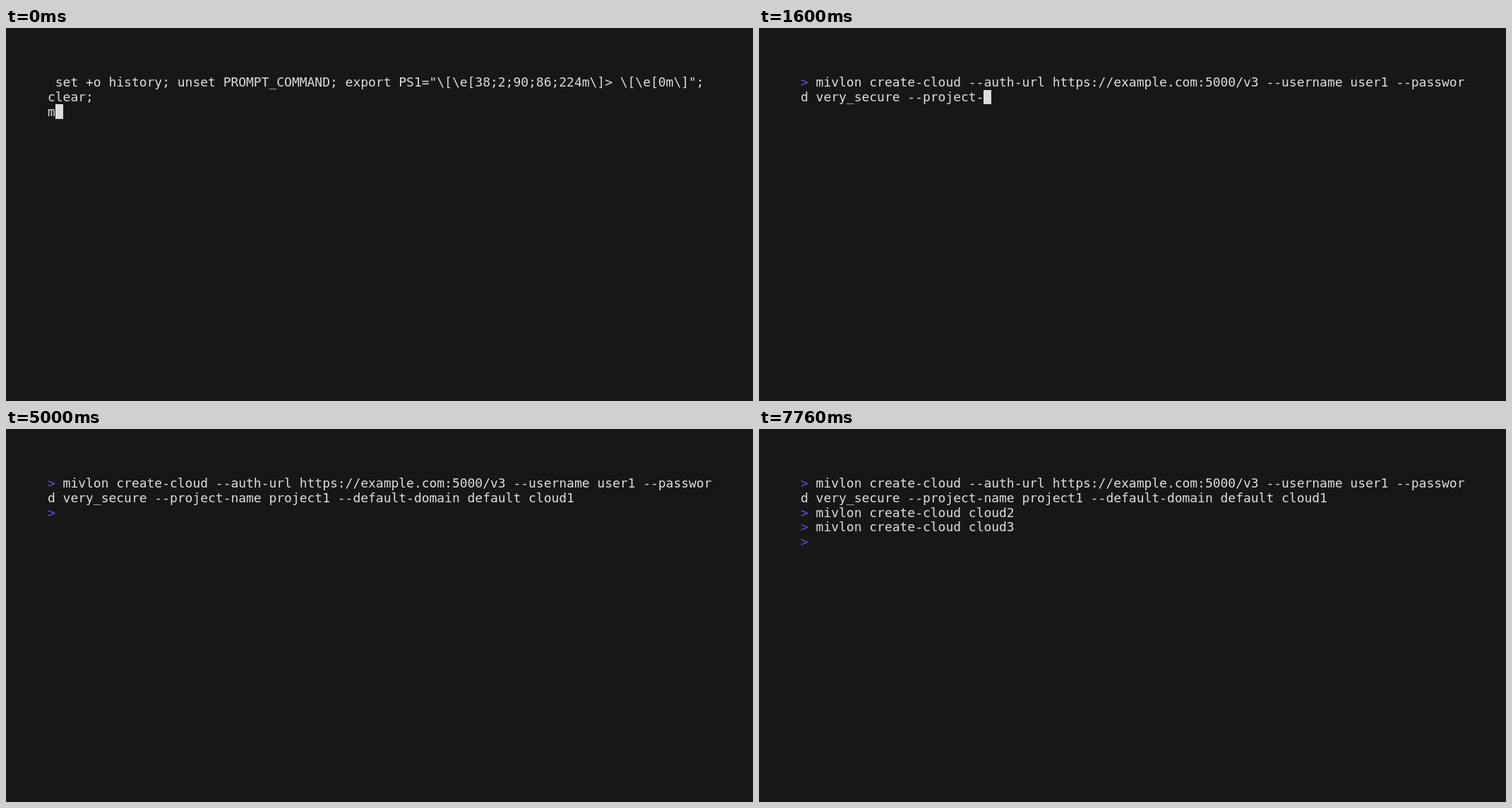
Recreate the animation shown at these times as an HTML page with a canvas. Size 1058 by 529 pixels, loop 8000 ms.

```html
<!DOCTYPE html>
<html lang="en">
<head>
<meta charset="utf-8">
<title>Terminal session</title>
<style>
  html, body { margin: 0; width: 100%; height: 100%; overflow: hidden; background: #171717; }
  canvas { display: block; }
</style>
</head>
<body>
<canvas id="screen" width="1058" height="529"></canvas>
<script>
const ctx = document.getElementById("screen").getContext("2d");
const LOOP = 8000, TICK = 20, COLUMNS = 87;
const LEFT = 59, TOP = 66.9, CELL_W = 10.81, CELL_H = 20.79, BASELINE = 16.2;
const BACKGROUND = "#171717", TEXT = "#dddddd", PROMPT = "#5a56e0";

const SETUP = [
  ' set +o history; unset PROMPT_COMMAND; export PS1="\\[\\e[38;2;90;86;224m\\]> \\[\\e[0m\\]";',
  "clear;",
  "m"
];

// Each key is a time in ms and the number of keystrokes made by then, Enter included.
const COMMANDS = [
  {
    text: "mivlon create-cloud --auth-url https://example.com:5000/v3 --username user1" +
          " --password very_secure --project-name project1 --default-domain default cloud1",
    keys: [[0, 1], [1000, 66], [1600, 109], [2320, 155]]
  },
  { text: "mivlon create-cloud cloud2", keys: [[5020, 1], [5400, 27]] },
  { text: "mivlon create-cloud cloud3", keys: [[6820, 1], [7200, 26], [7220, 27]] }
];

// The cursor starts visible and flips at each of these times.
const CURSOR_FLIPS = [2880, 3440, 4000, 4480, 5000, 5020, 5980, 6520, 7760];

function keystrokes(keys, time) {
  if (time < keys[0][0]) return 0;
  for (let i = 1; i < keys.length; i++) {
    const [t0, n0] = keys[i - 1], [t1, n1] = keys[i];
    if (time < t1) return Math.floor(n0 + (n1 - n0) * (time - t0) / (t1 - t0));
  }
  return keys[keys.length - 1][1];
}

function drawChar(char, row, column, color) {
  ctx.fillStyle = color;
  ctx.fillText(char, LEFT + column * CELL_W, TOP + row * CELL_H + BASELINE);
}

function drawCursor(row, column) {
  const x = Math.round(LEFT + column * CELL_W), y = Math.round(TOP + row * CELL_H);
  const right = Math.round(LEFT + (column + 1) * CELL_W);
  const bottom = Math.round(TOP + (row + 1) * CELL_H);
  ctx.fillStyle = TEXT;
  ctx.fillRect(x, y, right - x, bottom - y);
}

function drawSetup() {
  SETUP.forEach((line, row) => [...line].forEach((char, i) => drawChar(char, row, i, TEXT)));
  drawCursor(2, 1);
}

function drawSession(time) {
  let row = 0, column = 0;
  const put = (char, color) => {
    drawChar(char, row, column, color);
    if (++column === COLUMNS) { row++; column = 0; }
  };
  for (const { text, keys } of COMMANDS) {
    const count = keystrokes(keys, time);
    put(">", PROMPT);
    put(" ", TEXT);
    for (const char of text.slice(0, count)) put(char, TEXT);
    if (count <= text.length) break;
    row++;
    column = 0;
    // After the last command only a fresh prompt remains.
    if (text === COMMANDS[COMMANDS.length - 1].text) {
      put(">", PROMPT);
      put(" ", TEXT);
    }
  }
  const flips = CURSOR_FLIPS.filter(t => t <= time).length;
  if (flips % 2 === 0) drawCursor(row, column);
}

function draw() {
  const time = Math.floor((performance.now() % LOOP) / TICK) * TICK;
  ctx.fillStyle = BACKGROUND;
  ctx.fillRect(0, 0, 1058, 529);
  ctx.font = '18px "DejaVu Sans Mono", monospace';
  if (time < TICK) drawSetup();
  else drawSession(time);
  requestAnimationFrame(draw);
}
draw();
</script>
</body>
</html>
```
